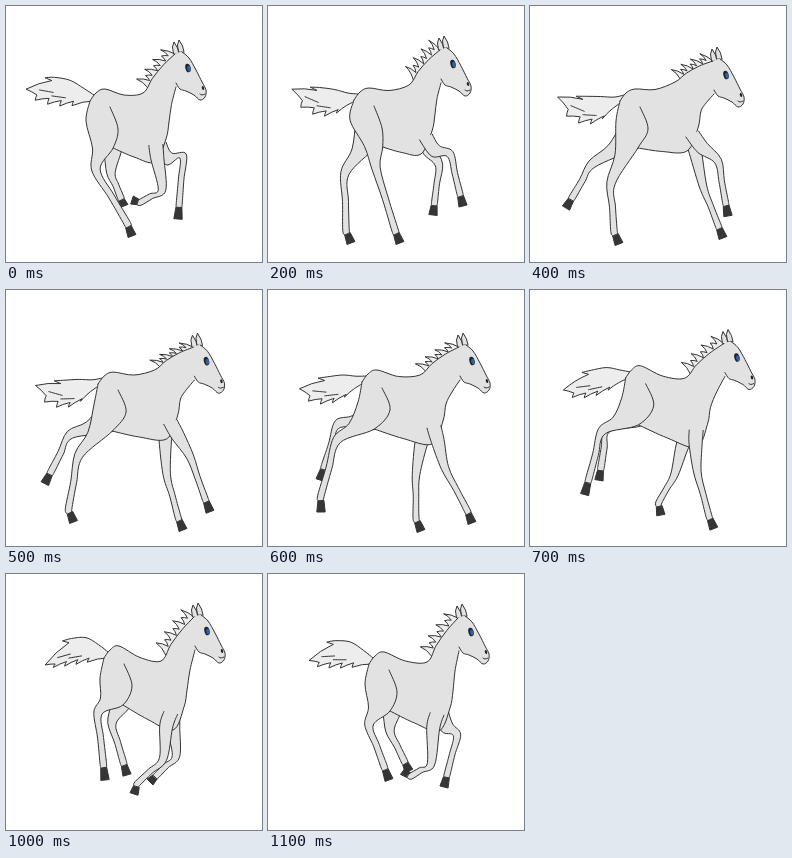
An HTML page with a canvas for the animation above (1200 ms loop, 256 by 256 pixels).

```html
<!DOCTYPE html>
<html lang="en">
<head>
<meta charset="utf-8">
<title>Galloping horse</title>
<style>
html, body { margin: 0; width: 100%; height: 100%; overflow: hidden; background: #fff; }
canvas { display: block; width: 100%; height: 100%; }
</style>
</head>
<body>
<canvas id="stage" width="256" height="256"></canvas>
<script>
const ctx = document.getElementById('stage').getContext('2d');
const LOOP = 1200, STEP = 100;
const COAT = '#e2e2e2', HAIR = '#ededed', INK = '#333', HOOF = '#363636';

const points = text => text.split(' ').map(p => p.split(',').map(Number));
const add = (p, x, y) => [p[0] + x, p[1] + y];
const mix = (a, b, k) => [a[0] + (b[0] - a[0]) * k, a[1] + (b[1] - a[1]) * k];
const clamp = v => Math.max(0, Math.min(1, v));
const wave = (time, peak, cycles = 1) => Math.cos(2 * Math.PI * cycles * (time - peak) / LOOP);

// Paths of the joints that drive the rig; all else follows from them
const tracks = {
  rump: points('84,95 86,94 90,95 94,92 97,84 98,84 101,90'),
  withers: points('137,87 141,79 145,76 152,85 156,90 155,87 159,88'),
  eye: points('183,62 186,58 197,69 205,71 209,63 202,57 204,58'),
  hock: points('90,164 108,162 81,177 69,150 78,136 92,139 101,151'),
  hindToe: points('126,230 132,237 89,238 53,222 65,191 99,206 121,206'),
  farHock: points('105,167 77,167 62,158 70,134 86,146 106,149 122,157'),
  farHindToe: points('118,200 83,237 36,202 52,190 88,193 121,201 141,197'),
  knee: points('156,184 182,148 188,155 177,178 159,184 157,185 163,190'),
  foreToe: points('126,194 195,200 198,210 204,233 159,239 128,220 135,197'),
  farKnee: points('177,150 171,159 173,180 148,185 147,183 170,182 189,161'),
  farForeToe: points('172,213 165,209 193,232 153,241 117,208 144,208 176,213')
};
const HEAD = points('-14,-14 -7,-16 0,-10 7,2 13,14 17,22 16,29 11,32 5,27 -3,23 -9,21 -13,15');

// Smooth path through the keys; the last stretch of the loop runs at double pace
function poseAt(time) {
  const u = time / 200 + Math.max(0, time - 1000) / 200;
  const i = Math.floor(u), k = u - i;
  const pose = {};
  for (const name in tracks) {
    const track = tracks[name];
    const [a, b, c, d] = [6, 7, 8, 9].map(n => track[(i + n) % 7]);
    pose[name] = [0, 1].map(n => b[n] + k / 2 * (c[n] - a[n] + k * (
      2 * a[n] - 5 * b[n] + 4 * c[n] - d[n] + k * (3 * (b[n] - c[n]) + d[n] - a[n]))));
  }
  return pose;
}

function curve(path, pts, joined) {
  if (joined) path.lineTo(...pts[0]); else path.moveTo(...pts[0]);
  for (let i = 0; i < pts.length - 1; i++) {
    const a = pts[i], b = pts[i + 1];
    const before = pts[i - 1] || a, after = pts[i + 2] || b;
    path.bezierCurveTo(
      a[0] + (b[0] - before[0]) / 6, a[1] + (b[1] - before[1]) / 6,
      b[0] - (after[0] - a[0]) / 6, b[1] - (after[1] - a[1]) / 6, ...b);
  }
}

function fillCurves(color, ...curves) {
  const path = new Path2D();
  curves.forEach((pts, i) => curve(path, pts, i > 0));
  ctx.fillStyle = color;
  ctx.fill(path);
}

function strokeCurves(...curves) {
  const path = new Path2D();
  curves.forEach(pts => curve(path, pts));
  ctx.stroke(path);
}

function paint(path, color) {
  ctx.fillStyle = color;
  ctx.fill(path);
  ctx.stroke(path);
}

function polygon(pts, color) {
  const path = new Path2D();
  pts.forEach(p => path.lineTo(...p));
  path.closePath();
  paint(path, color);
}

function spot(x, y, rx, ry, color) {
  ctx.fillStyle = color;
  ctx.beginPath();
  ctx.ellipse(x, y, rx, ry, -0.25, 0, 7);
  ctx.fill();
}

// Line bowed slightly to one side, for locks of hair
function bow(path, a, b, amount) {
  const m = mix(a, b, 0.5);
  path.quadraticCurveTo(m[0] - (b[1] - a[1]) * amount, m[1] + (b[0] - a[0]) * amount, ...b);
}

// Point beside p, square to the direction from a to b
function beside(p, a, b, distance) {
  const dx = b[0] - a[0], dy = b[1] - a[1], s = distance / Math.hypot(dx, dy);
  return add(p, -dy * s, dx * s);
}

// Both edges of a limb, leaving out the first centre point
function edges(centre, widths) {
  return [1, -1].map(sign => widths.map((w, i) =>
    beside(centre[i + 1], centre[i], centre[i + 2] || centre[i + 1], sign * w / 2)));
}

// Centre line from knee or hock down to the top of the hoof
function shank(joint, toe) {
  const length = Math.hypot(toe[0] - joint[0], toe[1] - joint[1]);
  const level = Math.max(0, 0.5 - (toe[1] - joint[1]) / length);
  const hanging = add(mix(joint, toe, 0.74), 0, 28 * level);
  const planted = add(toe, -5, -13);
  const ankle = mix(hanging, planted, clamp((toe[1] - 215) / 15));
  return [joint, mix(joint, ankle, 0.5), ankle, mix(ankle, toe, 0.3)];
}

function drawLeg(rear, front, top, toe) {
  fillCurves(COAT, rear, [...front].reverse());
  strokeCurves(rear, front);
  polygon([
    beside(top, top, toe, 3), beside(toe, top, toe, 4.2),
    beside(toe, top, toe, -4.2), beside(top, top, toe, -3)
  ], HOOF);
}

function foreleg(withers, knee, toe) {
  const reach = 4 + 0.55 * (knee[0] - withers[0]);
  const shoulder = add(withers, 8 + reach / 3, 52);
  const elbow = add(withers, reach, 66);
  const centre = [add(shoulder, 0, -8), shoulder, elbow, ...shank(knee, toe)];
  const [rear, front] = edges(centre, [14, 13, 7.5, 5.5, 6, 5.5]);
  drawLeg(rear, front, centre[6], toe);
}

const flankOf = (rump, hock) => add(rump, 21 + 0.35 * (hock[0] - rump[0]), 47);

function hindleg(rump, hock, toe) {
  const flank = flankOf(rump, hock);
  const buttock = mix(add(rump, -1, 25), hock, 0.5);
  const centre = [mix(buttock, flank, 0.4), ...shank(hock, toe)];
  const [rear, front] = edges(centre, [8.5, 6, 6.5, 5.5]);
  drawLeg(
    [rump, add(rump, -4, 20), buttock, ...rear],
    [add(rump, 20, 6), add(rump, 28, 28), flank, ...front], centre[4], toe);
}

function tail(rump, time) {
  const root = add(rump, 4, -3);
  const tip = [20 + 21 * time / 1100, 91 + 9 * wave(time, 700)];
  const arch = 11 * wave(time, 970) - 1;
  const at = (u, side) => add(mix(root, tip, u), 0,
    -4 * arch * u * (1 - u) + side * (3 + 10 * Math.sin(Math.PI * u)));
  const path = new Path2D();
  curve(path, [at(0, -1), at(0.15, -0.9), at(0.35, -1), at(0.58, -1), add(at(0.66, -1), -4, 0)]);
  let last = at(0.62, -0.75);
  path.lineTo(...last);
  bow(path, last, tip, 0.08);
  last = tip;
  for (let u = 0.84; u > 0.2; u -= 0.18) {
    const notch = at(u, 0.75), lock = add(at(u - 0.05, 1), -5, 2);
    bow(path, last, notch, -0.06);
    bow(path, notch, lock, 0.1);
    last = lock;
  }
  bow(path, last, at(0, 1), -0.1);
  paint(path, HAIR);
  strokeCurves([at(0.8, 0.1), at(0.6, 0.2)], [at(0.62, 0.5), at(0.42, 0.5)]);
}

function mane(poll, withers, time) {
  const lift = 0.5 + 0.25 * wave(time, 250, 2);
  const path = new Path2D();
  let last = poll;
  path.moveTo(...last);
  for (let i = 0; i < 7; i++) {
    const length = i % 2 ? 10 : 15;
    const tip = add(mix(poll, withers, i * 0.125), -length * Math.cos(lift), -length * Math.sin(lift));
    const notch = mix(mix(poll, withers, i * 0.125 + 0.11), tip, i < 6 ? 0.3 : 0);
    bow(path, last, tip, 0.12);
    bow(path, tip, notch, -0.15);
    last = notch;
  }
  paint(path, HAIR);
}

function body({ rump, withers, eye, hock }, poll) {
  const croup = add(rump, 15, -12);
  const throat = add(eye, -13, 19), chest = add(withers, 26, 29);
  const brisket = add(withers, 12, 69), flank = flankOf(rump, hock);
  const back = [
    rump, add(rump, 6, -8), croup, add(mix(croup, withers, 0.5), 0, 4), withers,
    add(mix(withers, poll, 0.33), -1, -2), add(mix(withers, poll, 0.67), -1, -2), poll
  ];
  const front = [
    throat, add(mix(throat, chest, 0.5), -1, 0), chest, add(withers, 23, 46),
    brisket, add(mix(brisket, flank, 0.5), 0, 2), flank
  ];
  fillCurves(COAT, back, [eye], front);
  strokeCurves(back, front);
}

function head(eye) {
  ctx.save();
  ctx.translate(...eye);
  for (const [x, y] of [[-8, -16], [-13, -14]])
    polygon([[x - 2.5, y], [x - 3.5, y - 7], [x - 2, y - 12], [x + 1.5, y - 6], [x + 3, y]], COAT);
  fillCurves(COAT, HEAD);
  strokeCurves(HEAD.slice(1), [[16, 26], [13, 27], [11, 26]]);
  spot(14, 20, 1.2, 2, '#222');
  spot(-1, 0, 2.6, 4.4, '#222');
  spot(0, 0.6, 1.8, 3, '#2d62a8');
  ctx.restore();
}

function draw(time) {
  const p = poseAt(time);
  const poll = add(p.eye, -14, -14);
  ctx.fillStyle = '#fff';
  ctx.fillRect(0, 0, 256, 256);
  ctx.strokeStyle = INK;
  ctx.lineWidth = 1;
  ctx.lineJoin = ctx.lineCap = 'round';
  tail(p.rump, time);
  hindleg(add(p.rump, 6, 0), p.farHock, p.farHindToe);
  foreleg(p.withers, p.farKnee, p.farForeToe);
  mane(poll, p.withers, time);
  body(p, poll);
  hindleg(p.rump, p.hock, p.hindToe);
  foreleg(p.withers, p.knee, p.foreToe);
  head(p.eye);
}

const start = performance.now();
function tick() {
  const time = (performance.now() - start) % LOOP;
  draw(Math.floor(time / STEP) * STEP);
  requestAnimationFrame(tick);
}
tick();
</script>
</body>
</html>
```
